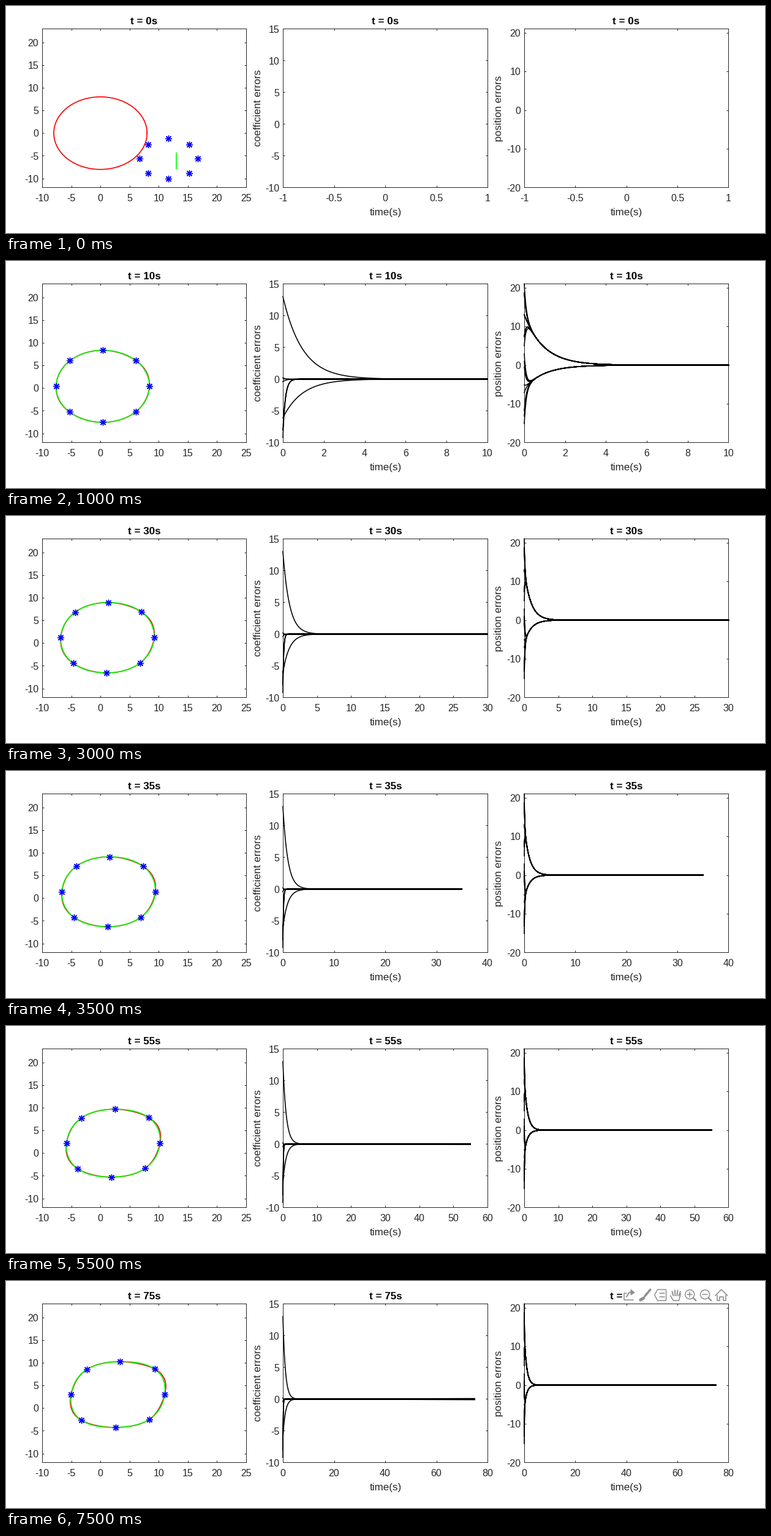
Write a matplotlib script that moves like this. It is 1239 by 372 pixels and loops after 8000 ms.

```python
import numpy as np
import matplotlib.pyplot as plt
from matplotlib.animation import FuncAnimation
from matplotlib.patches import Circle, Polygon, Rectangle

W, H = 1239, 372
FRAMES, STEP_MS = 16, 500
INK = "#262626"
GREY = "#8f8f8f"

plt.rcParams.update({
    "font.family": "Liberation Sans",
    "axes.unicode_minus": False,
    "font.size": 16,
    "path.simplify": False,
})

# At 72 dpi one point is one pixel.
fig = plt.figure(figsize=((W + 1e-6) / 72, (H + 1e-6) / 72), dpi=72,
                 facecolor="white")

overlay = fig.add_axes([0, 0, 1, 1], zorder=5)
overlay.set(xlim=(0, W), ylim=(H, 0))
overlay.axis("off")


def make_panel(left, right, ylim, yticks):
    top, bottom = 37.5, 297.5
    ax = fig.add_axes([left / W, 1 - bottom / H, (right - left) / W,
                       (bottom - top) / H])
    ax.set_ylim(*ylim)
    ax.set_yticks(yticks, [f"{v:g}" for v in yticks])
    ax.tick_params(direction="in", length=3.4, width=1, color=INK,
                   labelcolor=INK, top=True, right=True)
    ax.tick_params(axis="x", pad=10.3)
    ax.tick_params(axis="y", pad=6)
    for spine in ax.spines.values():
        spine.set(linewidth=1, color=INK)
    return ax


def set_xaxis(ax, lo, hi, step):
    ticks = np.arange(lo, hi + step / 2, step)
    ax.set_xlim(lo, hi)
    ax.set_xticks(ticks, [f"{v:g}" for v in ticks])


def label(x, y, text, **kw):
    opts = dict(ha="center", va="baseline", rotation_mode="anchor",
                fontsize=17, color=INK)
    return overlay.text(x, y, text, **{**opts, **kw})


shape_ax = make_panel(59, 392, (-12, 23), range(-10, 21, 5))
coef_ax = make_panel(452, 786, (-10, 15), range(-10, 16, 5))
pos_ax = make_panel(846, 1179.4, (-20, 21), range(-20, 21, 10))
set_xaxis(shape_ax, -10, 25, 5)

centers = (225.5, 619.5, 1012.5)
titles = [label(x, 30, "", weight="bold", color="black") for x in centers]
for x, name in zip(centers[1:], ("coefficient errors", "position errors")):
    label(x + 0.5, 343, "time(s)")
    label(x - 204, 167.5, name, rotation=90)

red, = shape_ax.plot([], [], color="red", lw=1.7)
green, = shape_ax.plot([], [], color="lime", lw=1.7)
stars, = shape_ax.plot([], [], ls="none", marker=(8, 2, 0), ms=11, mew=1.4,
                       color="blue")

ANGLES = np.linspace(0, 2 * np.pi, 241)
STAR_ANGLES = np.arange(8) * np.pi / 4

# Each error is slow * exp(-1.05 t) + fast * exp(-rate t) + drift * t.
coef_terms = [(13, 0, 1, 0), (-6.1, 0, 1, 0), (0, -8, 8, 0), (0, -9.2, 8.5, 0),
              (0, 0.2, 10, 0.0012), (0, -0.4, 6, -0.0014)]
pos_terms = [(13, 8 * np.cos(a), 10, 0) for a in STAR_ANGLES]
pos_terms += [(-6.1, np.cos(a) - 9 * np.sin(a), 10, 0) for a in STAR_ANGLES]


def error_line(ax):
    line, = ax.plot([], [], color="black", lw=1.6, zorder=3, clip_on=False)
    return line


error_lines = [(error_line(coef_ax), coef_terms),
               (error_line(pos_ax), pos_terms)]

toolbar = []


def add_icon(patch):
    toolbar.append(overlay.add_patch(patch))


def stroke(*points, lw=1.6, closed=False, fill=False):
    add_icon(Polygon(points, closed=closed, fill=fill, fc=GREY, ec=GREY,
                     lw=lw, joinstyle="round", capstyle="round", zorder=11))


def share(x, y):
    stroke((x - 6, y - 3), (x - 10, y - 3), (x - 10, y + 8), (x + 5, y + 8))
    stroke((x - 6, y + 3), (x - 2, y - 4), (x + 2, y - 5), lw=2)
    stroke((x + 1, y - 9), (x + 7, y - 4), (x + 1, y), lw=1, closed=True,
           fill=True)


def brush(x, y):
    stroke((x + 8, y - 9), (x - 1, y + 2), lw=3.5)
    stroke((x - 8, y + 8), (x - 3, y + 5), lw=5)


def data_tip(x, y):
    stroke((x - 10, y), (x - 5, y - 9), (x + 9, y - 9), (x + 9, y + 9),
           (x - 5, y + 9), lw=1.5, closed=True)
    for dy in (-3, 3):
        stroke((x - 2, y + dy), (x + 6, y + dy))


def hand(x, y):
    for k in range(4):
        tip = x - 6 + 4.5 * k
        stroke((tip, y - 8 + (k - 1.5) ** 2), (x - 4 + 3 * k, y + 1), lw=2)
    stroke((x - 9, y + 1), (x - 4, y + 9), (x + 5, y + 9), (x + 8, y - 2))


def magnifier(x, y, plus):
    add_icon(Circle((x - 2, y - 1), 7.5, fill=False, ec=GREY, lw=1.5,
                    zorder=11))
    stroke((x + 4, y + 5), (x + 8, y + 9), lw=2.4)
    stroke((x - 6, y - 1), (x + 2, y - 1))
    if plus:
        stroke((x - 2, y - 5), (x - 2, y + 3))


def home(x, y):
    stroke((x - 10, y + 1), (x, y - 9), (x + 10, y + 1))
    for side in (-1, 1):
        stroke((x + 7 * side, y), (x + 7 * side, y + 9),
               (x + 3 * side, y + 9), (x + 3 * side, y + 3), (x, y + 3))


add_icon(Rectangle((1006, 11), 173, 25, fc="white", ec="none", zorder=10))
icons = (share, brush, data_tip, hand, lambda x, y: magnifier(x, y, True),
         lambda x, y: magnifier(x, y, False), home)
for k, icon in enumerate(icons):
    icon(1019 + 24.8 * k, 23)


def outline(a, t):
    """Slowly deforming closed curve drifting up and to the right."""
    s = (t / 75) ** 1.25
    c1, s1, c3, s3 = np.cos(a), np.sin(a), np.cos(3 * a), np.sin(3 * a)
    x = 8 * c1 + s * (0.14 * c1 + 0.53 * s1 - 0.11 * c3 + 0.13 * s3)
    y = 8 * s1 + s * (0.05 * c1 - 0.435 * s1 - 0.05 * c3 + 0.315 * s3)
    return x + 0.04 * t, y + 0.04 * t


def ripple(a, t):
    """Radial gap between both curves, zero at every star."""
    size = min(t / 5, 1) * (0.07 + 0.002 * t)
    weight = 0.5 + 0.35 * np.cos(2 * a - 1) + 0.2 * np.cos(a - 0.4)
    return size * np.sin(4 * a) * weight


def time_axis(t):
    """Round limits and the finest step giving at most six intervals."""
    if t == 0:
        return -1, 1, 0.5
    step = next(s for s in (1, 2, 5, 10, 20) if t <= 6 * s)
    return 0, step * np.ceil(t / step), step


def error_paths(terms, t):
    """All error curves joined into one path with gaps between them."""
    ts = np.append(np.arange(0, t + 0.01, 0.02), np.nan)
    ys = [slow * np.exp(-1.05 * ts) + fast * np.exp(-rate * ts) + drift * ts
          for slow, fast, rate, drift in terms]
    return np.tile(ts, len(terms)), np.concatenate(ys)


def draw(i):
    t = 5 * i
    for title in titles:
        title.set_text(f"t = {t}s")
    for ax in (coef_ax, pos_ax):
        set_xaxis(ax, *time_axis(t))

    x, y = outline(ANGLES, t)
    gap = ripple(ANGLES, t)
    red.set_data(x + gap * np.cos(ANGLES), y + gap * np.sin(ANGLES))
    if t == 0:
        green.set_data([13, 13], [-7.85, -4.36])
        stars.set_data(11.7 + 5 * np.cos(STAR_ANGLES),
                       -5.65 + 4.45 * np.sin(STAR_ANGLES))
    else:
        green.set_data(x, y)
        stars.set_data(*outline(STAR_ANGLES, t))

    for line, terms in error_lines:
        line.set_data(*error_paths(terms, t))
        line.set_visible(t > 0)

    alpha = np.clip((t - 65) / 10, 0, 1)
    for part in toolbar:
        part.set_alpha(alpha)
        part.set_visible(alpha > 0)


anim = FuncAnimation(fig, draw, frames=FRAMES, interval=STEP_MS, repeat=True,
                     repeat_delay=0, blit=False)
plt.show()
```
